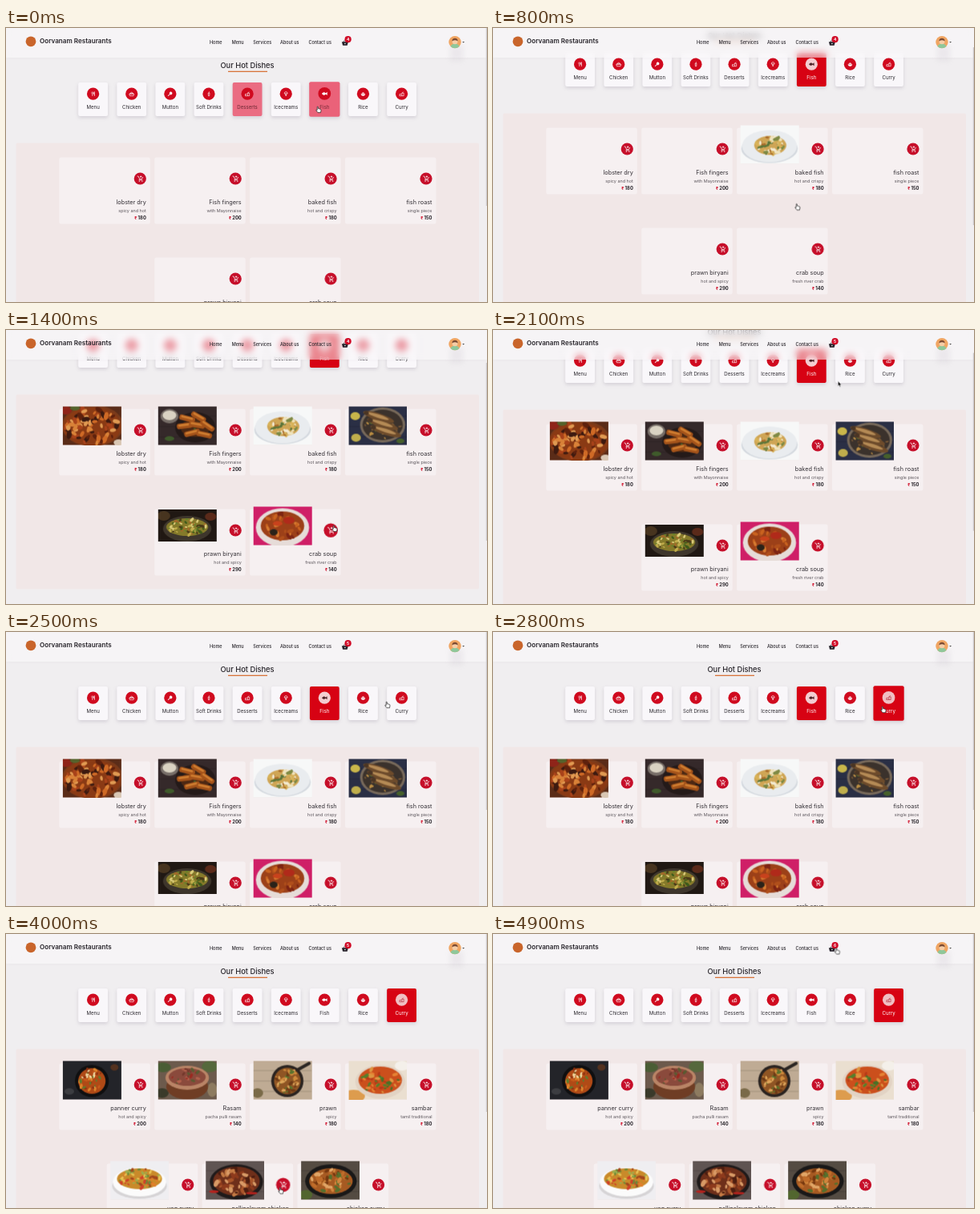
These frames come from a looping animation (600x342 px, 5000 ms). An HTML page:

```html
<!DOCTYPE html>
<html lang="en">
<head>
<meta charset="utf-8">
<title>Hot dishes</title>
<style>
html, body { margin: 0; width: 100%; height: 100%; overflow: hidden; background: #f0eef0; }
body { position: relative; font-family: Inter, "Open Sans", sans-serif; --s: 0; animation: scroll 5s step-end infinite; }
svg { position: absolute; left: 0; top: 0; display: block; }
#page { transform: translateY(calc(var(--s) * -1px)); }
#thumb { fill: #cbc8cb; transform: translateY(calc(var(--s) * .65px)); }
#bar { position: absolute; left: 0; top: 0; width: 600px; height: 36.5px; background: rgba(252, 249, 252, .52);
  backdrop-filter: blur(4px); box-shadow: 0 1px 3px rgba(90, 80, 100, .03); }
text { fill: #27242a; }
.nav { font-size: 5.5px; font-weight: 450; }
.brand { font-size: 8.1px; font-weight: 600; }
.head { font-size: 9.3px; font-weight: 450; text-anchor: middle; }
.dish { font-size: 7.3px; text-anchor: end; fill: #343036; }
.note { font-size: 5.45px; text-anchor: end; fill: #5c565c; }
.price { font-size: 5.8px; font-weight: 700; text-anchor: end; }
.price tspan { fill: #d0102a; font-size: 5.2px; }
.num { font-size: 5px; font-weight: 700; text-anchor: middle; fill: #fff; }
.glow { fill: #b9b0bd; opacity: .16; filter: blur(3px); }

.cat { --bg: #f9f7fa; --dot: #d00a1f; --ink: #fff; --label: #2b282e;
  transform-box: fill-box; transform-origin: center; }
.cat rect { fill: var(--bg); filter: drop-shadow(0 2px 2px rgba(70, 60, 90, .17)); }
.cat circle { fill: var(--dot); }
.cat path { stroke: var(--ink); stroke-width: .65; fill: none; }
.cat .solid { fill: var(--ink); stroke-width: .2; }
.cat text { fill: var(--label); font-size: 6.1px; text-anchor: middle; }

.t, .cat, .pop { animation: 5s step-end infinite; }
.Desserts { animation-name: leave; }
.Fish { animation-name: fish; }
.Curry { animation-name: curry; }
.pop { transform-box: fill-box; transform-origin: center; }
.pop.crab { animation-name: popCrab; }
.pop.chicken { animation-name: popChicken; }
#cursor { animation: move 5s linear infinite; }
#hand { animation-name: hand; }
#arrow { animation-name: arrow; }

@keyframes scroll {
  0% { --s: 0; }
  12% { --s: 8; }
  14% { --s: 22; }
  16% { --s: 37; }
  18% { --s: 48; }
  20% { --s: 56; }
  22% { --s: 61; }
  24% { --s: 63; }
  38% { --s: 61; }
  40% { --s: 54; }
  42% { --s: 44; }
  44% { --s: 28; }
  46% { --s: 12; }
  48% { --s: 3; }
  50%, 100% { --s: 0; }
}
@keyframes leave {
  0% { --bg: #ea6c82; --label: #6d2733; }
  2% { --bg: #f2abb7; --label: #4c2730; }
  4% { --bg: #f7dfe4; --label: #2b282e; }
  6%, 100% { --bg: #f9f7fa; --label: #2b282e; }
}
@keyframes fish {
  0% { --bg: #ea6279; --label: #7d2c3a; --dot: #d00a1f; --ink: #fff; transform: scale(1.04); }
  2% { --bg: #e13149; --label: #e0b0b8; --dot: #e0707c; --ink: #fff; transform: scale(1.04); }
  4% { --bg: #d70213; --label: #fff; --dot: #f3cdd1; --ink: #4c2328; transform: scale(1.04); }
  8% { --bg: #d70213; --label: #fff; --dot: #f3cdd1; --ink: #4c2328; transform: none; }
  58% { --bg: #ea6c82; --label: #6d2733; --dot: #d00a1f; --ink: #fff; transform: none; }
  60% { --bg: #f3b3be; --label: #2b282e; --dot: #d00a1f; --ink: #fff; transform: none; }
  62%, 100% { --bg: #f9f7fa; --label: #2b282e; --dot: #d00a1f; --ink: #fff; transform: none; }
}
@keyframes curry {
  0% { transform: none; }
  52% { --bg: #ea6279; --label: #7d2c3a; --dot: #d00a1f; --ink: #fff; transform: scale(1.04); }
  54% { --bg: #d70213; --label: #fff; --dot: #f0bfc3; --ink: #b02a36; transform: scale(1.04); }
  62%, 100% { --bg: #d70213; --label: #fff; --dot: #f0bfc3; --ink: #b02a36; transform: none; }
}
@keyframes popCrab { 0% { transform: none; } 28% { transform: scale(1.15); } 38%, 100% { transform: none; } }
@keyframes popChicken { 0% { transform: none; } 72% { transform: scale(1.15); } 88%, 100% { transform: none; } }
@keyframes move {
  0% { transform: translate(390px, 102px); }
  6% { transform: translate(390px, 102px); animation-timing-function: steps(5); }
  16% { transform: translate(380px, 223.5px); }
  20% { transform: translate(380px, 223.5px); animation-timing-function: steps(3); }
  26% { transform: translate(410px, 248px); }
  36% { transform: translate(410px, 248px); animation-timing-function: steps(3); }
  42% { transform: translate(432px, 67.5px); animation-timing-function: steps(5); }
  52% { transform: translate(487px, 97px); }
  60% { transform: translate(487px, 97px); animation-timing-function: steps(6); }
  72% { transform: translate(343px, 320.5px); }
  86% { transform: translate(343px, 320.5px); animation-timing-function: steps(5); }
  96%, 100% { transform: translate(429.5px, 21.5px); }
}
@keyframes hand { 0% { opacity: 1; } 38% { opacity: 0; } 50% { opacity: 1; } 64% { opacity: 0; } 72% { opacity: 1; } 88% { opacity: 0; } 94%, 100% { opacity: 1; } }
@keyframes arrow { 0% { opacity: 0; } 38% { opacity: 1; } 50% { opacity: 0; } 64% { opacity: 1; } 72% { opacity: 0; } 88% { opacity: 1; } 94%, 100% { opacity: 0; } }
</style>
</head>
<body>
<svg id="page" width="600" height="460" viewBox="0 0 600 460"></svg>
<div id="bar"></div>
<svg id="top" width="600" height="342" viewBox="0 0 600 342"></svg>
<script>
const rules = [];

// Class and style that show an element only from one time to another (ms).
function during(from, to = 5000) {
  const name = `on${from}to${to}`;
  rules.push(`@keyframes ${name}{0%{opacity:${from ? 0 : 1}}${from / 50}%{opacity:1}${to / 50}%{opacity:0}}`);
  return `class="t" style="animation-name:${name}"`;
}

const text = (cls, x, y, s) => `<text class="${cls}" x="${x}" y="${y}">${s}</text>`;
const oval = (x, y, rx, ry, fill) => `<ellipse cx="${x}" cy="${y}" rx="${rx}" ry="${ry}" fill="${fill}"/>`;
const at = (x, y, body) => `<g transform="translate(${x} ${y})">${body}</g>`;

function random(seed) {
  return () => (seed = (seed * 16807) % 2147483647) / 2147483647;
}

// Seeded scraps of food inside an ellipse.
function scraps([x, y, rx, ry], colors, size, count, seed) {
  const rnd = random(seed * 7919 + 11);
  let out = '';
  for (let i = 0; i < count; i++) {
    const a = rnd() * 6.283, r = Math.sqrt(rnd()) * .9;
    const px = x + Math.cos(a) * r * rx, py = y + Math.sin(a) * r * ry;
    const w = size * (.6 + rnd() * .8), turn = rnd() * 180;
    out += `<ellipse rx="${w.toFixed(1)}" ry="${(w * .55).toFixed(1)}" fill="${colors[i % colors.length]}"
      transform="translate(${px.toFixed(1)} ${py.toFixed(1)}) rotate(${turn | 0})"/>`;
  }
  return out;
}

const sticks = [[36, 15, 14], [50, 13, 30], [33, 24, -8], [48, 23, 10], [61, 24, 35], [42, 33, -14], [57, 35, 12]]
  .map(([x, y, a]) => `<g transform="translate(${x} ${y}) rotate(${a})"><rect x="-10" y="-3.4" width="20" height="6.8" rx="3" fill="#a4531a"/>
    <rect x="-8" y="-2.4" width="15" height="2.6" rx="1.2" fill="#cf7d30"/></g>`).join('');
const fishes = [[37, 13], [42, 22], [46, 31]]
  .map(([x, y]) => `<g transform="translate(${x} ${y}) rotate(18)">${oval(0, 0, 20, 4.6, '#6d4b2b')}${oval(-1, -.8, 14, 2.2, '#b48a55')}${oval(-16, 0, 3, 2.5, '#4a3524')}</g>`).join('');
const leaves = oval(6, 8, 10, 6, '#4a5d35') + oval(64, 7, 10, 7, '#55683c') + oval(67, 36, 6, 9, '#8d7b60') + oval(5, 40, 8, 6, '#3a3a2a');
const handle = '<path d="M53 12L69 3" stroke="#2b2623" stroke-width="4" stroke-linecap="round"/>';
const planks = '<path d="M0 12H72M0 25H72M0 38H72" stroke="#000" stroke-opacity=".16"/>';

// bg, plate and food ellipses, scrap colours, scrap size and count, extra shapes under and over
const looks = {
  lobster: { bg: '#5a2c18', plate: [37, 24, 38, 26, '#7a3a1a'], food: [36, 25, 36, 24, '#8a3a14'], bits: ['#cf6a26', '#5e210d', '#e09a52', '#a8421a', '#d98238', '#3d1a10'], size: 4, n: 84, over: oval(4, 5, 7, 5, '#8f2419') + oval(15, 2, 6, 3, '#55632c') + oval(69, 45, 6, 4, '#d9c7b4') },
  fingers: { bg: '#35292a', under: planks, plate: [46, 26, 25, 19, '#241a19'], food: [46, 27, 18, 11, '#4d2813'], bits: ['#44602b'], size: 2, n: 6, over: sticks + oval(14, 12, 11, 9, '#776e68') + oval(14, 11, 8.5, 6, '#d9d2c2') + oval(14, 40, 6, 3, '#3f5a2b') },
  baked: { bg: '#f7f8f8', plate: [36, 26, 34, 20, '#e9ecef'], under: oval(36, 29, 35, 18, '#d3d8de'), food: [37, 25, 20, 12, '#cfa555'], bits: ['#efe3bd', '#5c7539', '#a96c2b', '#f3ead0', '#d8b258', '#7f8a45'], size: 3, n: 44 },
  roast: { bg: '#2a2f45', under: planks, plate: [42, 23, 28, 22, '#77695a'], food: [42, 23, 25, 19, '#3b322c'], bits: ['#55702f', '#b98d43', '#7c5a37'], size: 2.2, n: 26, over: fishes + oval(8, 12, 6, 5, '#c9b64a') + oval(9, 39, 6, 5, '#bfae4c') + oval(64, 43, 5, 3, '#46602b') },
  biryani: { bg: '#201813', plate: [36, 24, 30, 16, '#3e362c'], food: [36, 22, 26, 11, '#857a2a'], bits: ['#c2ad4c', '#66802b', '#ddcd7a', '#3d5a1b', '#a5682a', '#4a3a18'], size: 2.2, n: 66, under: oval(7, 8, 8, 6, '#47341f') + oval(65, 9, 7, 5, '#5a2a1a') },
  crab: { bg: '#cf1f67', plate: [36, 26, 33, 24, '#e6dcd8'], food: [36, 24, 27, 18, '#9c4018'], bits: ['#c9621f', '#7d2413', '#b04f1b', '#d67a30'], size: 3.2, n: 26, over: oval(44, 17, 7, 4.5, '#b02a1a') + oval(30, 21, 6, 3, '#c8421c') + oval(25, 32, 5, 4, '#2b2219') },
  panner: { bg: '#232429', plate: [36, 25, 21, 20, '#0f0f10'], food: [36, 25, 17, 16, '#b04a16'], bits: ['#f0d8a0', '#dd842b', '#c75a1a', '#5f7d2e', '#8a3010'], size: 2.3, n: 44, under: oval(8, 38, 6, 4, '#3c3d41') + oval(64, 8, 5, 4, '#54321f') },
  rasam: { bg: '#6c5a4c', under: leaves + oval(36, 32, 26, 16, '#6f3d24'), plate: [36, 21, 27, 15, '#b98466'], food: [36, 20, 23, 11, '#8a4a3c'], bits: ['#b0604b', '#5a5a31', '#9a2a20', '#74382c'], size: 2.4, n: 22 },
  prawn: { bg: '#bfab94', under: planks + handle, plate: [42, 25, 20, 20, '#2a2320'], food: [42, 25, 16.5, 16.5, '#8f5524'], bits: ['#cf8a3c', '#5a722c', '#6e3a16', '#dca45a'], size: 2.5, n: 48, over: oval(5, 40, 7, 6, '#7a6a48') },
  sambar: { bg: '#eadfd0', under: oval(6, 44, 14, 8, '#dd9c4e') + oval(66, 6, 9, 6, '#f4f0ea'), plate: [39, 26, 31, 21, '#e2d3c4'], food: [39, 24, 27, 17, '#cb4f1c'], bits: ['#e58233', '#557f2b', '#b83a18', '#dd9640', '#4a7026'], size: 2.8, n: 40 },
  veg: { bg: '#efeef1', under: oval(36, 31, 34, 16, '#d6d4d6'), plate: [36, 26, 33, 18, '#fbfbfb'], food: [36, 22, 28, 13, '#c98a2a'], bits: ['#cf4228', '#6c8a38', '#e8c252', '#e07f2b', '#9cae4e', '#a3481c'], size: 2.6, n: 60 },
  spicy: { bg: '#5f5452', under: planks, plate: [38, 26, 33, 22, '#1f1a1a'], food: [38, 25, 29, 18, '#6e2f1a'], bits: ['#a9552a', '#4e1e10', '#c47a44', '#8d3a1c', '#d89a66'], size: 3.6, n: 50, over: oval(57, 40, 7, 1.6, '#b5221d') + oval(10, 38, 6, 1.8, '#b5221d') },
  chicken: { bg: '#544b42', under: planks + oval(6, 42, 8, 6, '#52662f'), plate: [37, 25, 32, 21, '#191818'], food: [37, 25, 27, 16, '#a65a22'], bits: ['#d0853d', '#77380f', '#e0a566', '#56702d', '#bf6c2a'], size: 3.4, n: 46 }
};

function photo(key, h, seed) {
  const d = looks[key], top = key === 'biryani' ? 3.5 : 0;
  return `<svg x="4.6" y="${top - 3}" width="72.4" height="${h}" viewBox="0 0 72 ${h}" preserveAspectRatio="none">
    <rect width="72" height="48" fill="${d.bg}"/>${d.under || ''}${oval(...d.plate)}${oval(...d.food)}
    ${scraps(d.food, d.bits, d.size, d.n, seed)}${d.over || ''}</svg>`;
}

const trolley = `<circle r="7.6" fill="#c60f2a"/>
  <path d="M-3.6-3h1.3l1.7 3.6h2.7l1.4-2.6M-.6.6l-.8 1.3h4.4M.9-3.6v2.4M-.3-2.4h2.4" fill="none" stroke="#fff" stroke-width=".75"/>
  <circle cx="-1" cy="3.2" r=".6" fill="#fff"/><circle cx="2.6" cy="3.2" r=".6" fill="#fff"/>`;

function card([x, row, key, name, note, price, load], i) {
  const pop = key === 'crab' ? 'crab' : key === 'spicy' ? 'chicken' : '';
  return at(x, 161.5 + row * 125, `<rect width="113.5" height="83" rx="2.5" fill="#f6f0f1"/>
    <g ${during(load)}>${photo(key, key === 'biryani' ? 40 : 48, i + 3)}</g>
    ${at(101, 26.5, `<g class="pop ${pop}">${trolley}</g>`)}
    ${text('dish', 108.5, 58.2, name)}${text('note', 108.5, 68.5, note)}
    ${price ? text('price', 108.5, 77.1, `<tspan>₹</tspan> ${price}`) : ''}`);
}

const col = i => 66.3 + i * 118.9;
const fishMenu = [
  [col(0), 0, 'lobster', 'lobster dry', 'spicy and hot', 180, 1000],
  [col(1), 0, 'fingers', 'Fish fingers', 'with Mayonnaise', 200, 900],
  [col(2), 0, 'baked', 'baked fish', 'hot and crispy', 180, 700],
  [col(3), 0, 'roast', 'fish roast', 'single piece', 150, 1100],
  [col(1), 1, 'biryani', 'prawn biryani', 'hot and spicy', 290, 1200],
  [col(2), 1, 'crab', 'crab soup', 'fresh river crab', 140, 1000]
];
const curryMenu = [
  [col(0), 0, 'panner', 'panner curry', 'hot and spicy', 200, 3000],
  [col(1), 0, 'rasam', 'Rasam', 'pacha pulli rasam', 140, 3000],
  [col(2), 0, 'prawn', 'prawn', 'spicy', 180, 3000],
  [col(3), 0, 'sambar', 'sambar', 'tamil traditional', 180, 3000],
  [col(.5), 1, 'veg', 'veg curry', '', 0, 3000],
  [col(1.5), 1, 'spicy', 'pallipalayam chicken', '', 0, 3000],
  [col(2.5), 1, 'chicken', 'chicken curry', '', 0, 3000]
];

const box = 'M-2.8 2.5h5.4v-3.5h-2.4v3.5M-2.6 2.4v-2h2M.6-1l1.4-1.6';
const cats = [
  ['Menu', 'M-1.6-2.6v1.8q0 1 .8 1V2.8M-.1-2.6v1.8q0 .9-.7 1M1.8 2.8V-2.6q-1 1-1 3h1'],
  ['Chicken', 'M-3 .2h6l-.7 2.3h-4.6zM-2.2-.5q2.2-3 4.4 0z'],
  ['Mutton', 'M-3 2.4l2.2-2.2q-.6-2.4 1.6-2.8 2.2.6 1.6 2.6-1 1.6-2.8.8l-2 2z', 1],
  ['Soft Drinks', 'M-.8-1h1.8l-.3 3.6h-1.2zM.1-1l.4-1.8'],
  ['Desserts', box],
  ['Icecreams', 'M-2-.2q0-2.4 2-2.4t2 2.4zM-.8 0l.8 2.8.8-2.8'],
  ['Fish', 'M-3.2 0q2.4-3 4.6-.5l1.8-1.3v3.6l-1.8-1.3q-2.2 2.5-4.6-.5z', 1],
  ['Rice', 'M-2.7.2h5.4q-.4 2.3-2.7 2.3t-2.7-2.3zM-1.9-.4q1.9-2.6 3.8 0z', 1],
  ['Curry', box]
];
const catCards = cats.map(([name, icon, solid], i) => at(108.6 + 48.12 * i, 68,
  `<g class="cat ${name}"><rect x="-18.4" width="36.8" height="42" rx="2"/><circle cy="14.2" r="7.6"/>
  <path class="${solid ? 'solid' : ''}" d="${icon}" transform="translate(0 14.2)"/>${text('', 0, 32.8, name)}</g>`)).join('');

document.getElementById('page').innerHTML = text('head', 301, 49.5, 'Our Hot Dishes') +
  '<rect x="277" y="53.7" width="49" height="1.3" fill="#d8743a"/>' + catCards +
  '<rect x="12.5" y="143.5" width="577.5" height="243" rx="2" fill="#f1e7e7"/>' +
  `<g ${during(0, 2900)}>${fishMenu.map(card).join('')}</g>` +
  `<g ${during(2900)}>${curryMenu.map(card).join('')}</g>`;

const nav = [[254, 'Home'], [281.8, 'Menu'], [308.3, 'Services'], [342, 'About us'], [377.4, 'Contact us']];
const counts = [[4, 0, 1600], [5, 1600, 4100], [6, 4100, 5000]];

document.getElementById('top').innerHTML =
  '<rect id="thumb" x="598.8" width="1.2" height="222"/>' +
  '<rect class="glow" x="554" y="22" width="16" height="19"/>' +
  '<circle cx="31" cy="16.8" r="6.4" fill="#c9652b"/>' + text('brand', 42, 19.3, 'Oorvanam Restaurants') +
  nav.map(([x, s]) => text('nav', x, 19.7, s)).join('') +
  `<path d="M419.4 17.6h7l-.9 3.8h-5.2zM421 17.6l1.3-2.4M424.8 17.6l-1.3-2.4" fill="#26222a" stroke="#26222a" stroke-width=".7"/>
  <circle cx="422.9" cy="19.5" r=".8" fill="#f4f1f4"/><circle cx="426.6" cy="14.2" r="4.1" fill="#d00a26"/>` +
  counts.map(([n, a, b]) => `<g ${during(a, b)}>${text('num', 426.6, 16, n)}</g>`).join('') +
  at(560, 17.6, `<circle r="7.7" fill="#f0a562"/><path d="M-5.5 5.4Q-4 1.8 0 1.8T5.5 5.4A7.7 7.7 0 0 1-5.5 5.4z" fill="#8fc79a"/>
    <circle cy="-.8" r="3.5" fill="#f5cda6"/><path d="M-3.6-1.2a3.6 3.6 0 0 1 7.2 0Q0-3.4-3.6-1.2z" fill="#7a4a33"/>`) +
  '<path d="M569.2 17h2.8l-1.4 1.6z" fill="#444"/>' +
  `<g id="cursor">
    <path id="hand" class="t" d="M-1.8-3.8q.9-.6 1.2.4v2l2.6.6q1.2.3 1 1.6l-.5 2.8h-3.5l-2.2-2.8q-.2-1 .9-.6l.5.4z" fill="#fff" stroke="#222" stroke-width=".7"/>
    <path id="arrow" class="t" d="M-1.6-3.4v6l1.4-1.3 1 2.2 1-.5-1-2.1h1.9z" fill="#111" stroke="#fff" stroke-width=".4"/>
  </g>`;

const sheet = document.createElement('style');
sheet.textContent = rules.join('\n');
document.head.append(sheet);
</script>
</body>
</html>
```
